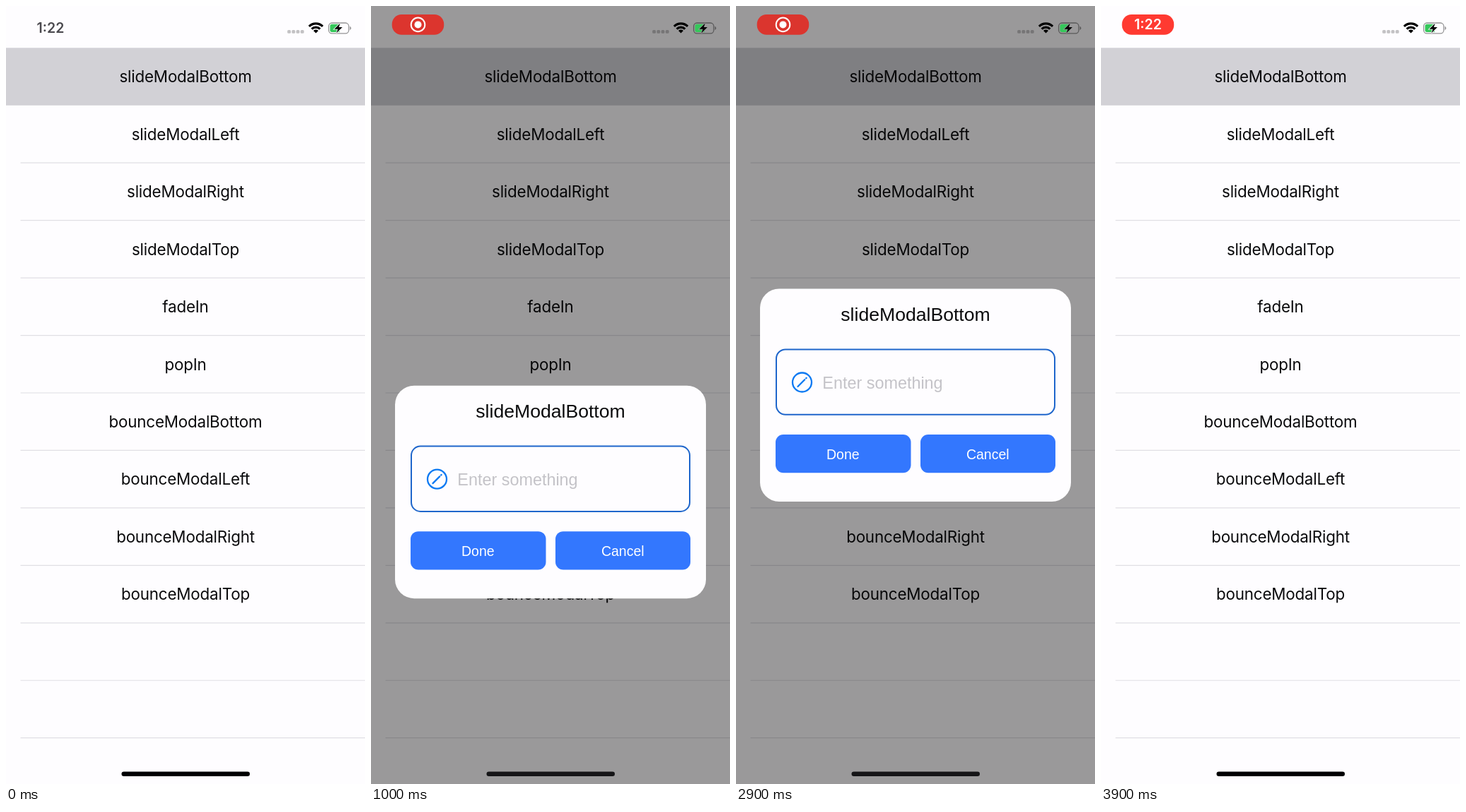
An HTML page that plays this animation: 508 by 1102 pixels, repeating every 4000 ms.

```html
<!DOCTYPE html>
<html lang="en">
<head>
<meta charset="utf-8">
<title>Modal slide</title>
<style>
  html, body { margin: 0; width: 100%; height: 100%; overflow: hidden; background: #fefdff; }
  svg { display: block; width: 100%; height: 100%; }
  text { text-anchor: middle; }
  #list text { font: 400 22.4px Inter, sans-serif; letter-spacing: -.2px; fill: #0a0a0c; }
  #list line { stroke: #e0dfe4; stroke-width: 1.2; }
  .clock { font: 600 19.5px Inter, sans-serif; }
  #modal text { font-family: "Liberation Sans", Arial, sans-serif; }
  #modal .button { font-size: 19.5px; fill: #fff; }
</style>
</head>
<body>
<svg viewBox="0 0 508 1102">
  <defs>
    <clipPath id="wedge"><path d="M438.5 38.5L422.5 22.5V10H454.5V22.5Z"/></clipPath>
  </defs>

  <rect width="508" height="1102" fill="#fefdff"/>
  <g id="list">
    <rect y="59.3" width="508" height="81.5" fill="#d2d1d6"/>
  </g>
  <rect id="dim" width="508" height="1102"/>

  <g id="modal">
    <rect x="34" y="400.5" width="440" height="301.5" rx="27" fill="#fefdff"/>
    <text x="254" y="445.5" font-size="26.6" fill="#0a0a0c">slideModalBottom</text>
    <rect x="57" y="486.4" width="394" height="92.4" rx="13" fill="none" stroke="#1f66cb" stroke-width="2"/>
    <g fill="none" stroke="#0b79f2" stroke-width="2.3" stroke-linecap="round">
      <circle cx="93.5" cy="533" r="13.5"/>
      <path d="M87.5 539L97.2 529.3M99.2 527.3L99.6 526.9"/>
    </g>
    <text x="122.3" y="541.5" font-size="23.4" fill="#c4c3c8" style="text-anchor:start">Enter something</text>
    <g fill="#3377fe">
      <rect x="56" y="607" width="191.5" height="54.3" rx="11"/>
      <rect x="261" y="607" width="191" height="54.3" rx="11"/>
    </g>
    <text class="button" x="151.3" y="641.7">Done</text>
    <text class="button" id="cancel" x="356.3" y="641.7">Cancel</text>
  </g>

  <g id="status">
    <g id="dots" fill-opacity=".23"></g>
    <g clip-path="url(#wedge)">
      <g fill="none" stroke="#000" stroke-width="3.1">
        <circle cx="438.5" cy="38.5" r="13.6"/>
        <circle cx="438.5" cy="38.5" r="8.4"/>
      </g>
      <circle cx="438.5" cy="38.5" r="4.9"/>
    </g>
    <rect x="456.6" y="24" width="28.4" height="14.8" rx="4.6" fill="none" stroke="#000" stroke-opacity=".42" stroke-width="1.3"/>
    <path d="M486.6 28.8a2.8 2.8 0 0 1 0 5.2Z" fill-opacity=".45"/>
    <path d="M461.2 25.8H472V37H461.2a2.7 2.7 0 0 1-2.7-2.7V28.500a2.7 2.7 0 0 1 2.700-2.700Z" fill="#35c75a"/>
    <path id="bolt" d="M472.800 24.500L464.500 32.700H469.600L467.400 38.400L476 30H471Z" stroke-width="1.600" paint-order="stroke"/>
  </g>

  <text class="clock" id="clock" x="63" y="38.200" fill="#4a494e">1:22</text>
  <g id="pill">
    <rect id="pillShape" x="29.700" y="12" width="73.500" height="28.800" rx="13.500"/>
    <g id="record">
      <circle cx="66.500" cy="26.400" r="9.800" fill="none" stroke="#fff" stroke-width="2"/>
      <circle cx="66.500" cy="26.400" r="5" fill="#fff"/>
    </g>
    <text class="clock" id="pillClock" x="66.500" y="33.300" fill="#fff">1:22</text>
  </g>
  <rect id="home" x="163.500" y="1084.500" width="181.500" height="6.600" rx="3.300"/>
</svg>

<script>
const LOOP = 4000, STEP = 100;
const ROW_TOP = 59.3, ROW_HEIGHT = 81.45, SLIDE = 702, DIM = .395;
const rows = ['slideModalBottom', 'slideModalLeft', 'slideModalRight', 'slideModalTop', 'fadeIn', 'popIn',
  'bounceModalBottom', 'bounceModalLeft', 'bounceModalRight', 'bounceModalTop'];

const $ = id => document.getElementById(id);
const add = (parent, tag, attrs, text = '') => {
  const node = document.createElementNS('http://www.w3.org/2000/svg', tag);
  for (const key in attrs) node.setAttribute(key, attrs[key]);
  node.textContent = text;
  parent.append(node);
};

for (let i = 0; i < 12; i++) {
  const top = ROW_TOP + i * ROW_HEIGHT, bottom = top + ROW_HEIGHT;
  if (i) add($('list'), 'line', { x1: 20.5, x2: 508, y1: bottom, y2: bottom });
  if (rows[i]) add($('list'), 'text', { x: 254, y: top + 49 }, rows[i]);
}
for (let i = 0; i < 4; i++) {
  add($('dots'), 'rect', { x: 398.2 + i * 6.2, y: 34, width: 4.8, height: 4.8, rx: 1.5 });
}

const ramp = (t, start, end) => Math.min(1, Math.max(0, (t - start) / (end - start)));
const ease = (t, start, end) => {
  const x = ramp(t, start, end);
  return x * x * (3 - 2 * x);
};
const mix = (a, b, p) => a + (b - a) * p;
const rgb = (...c) => `rgb(${c.map(Math.round)})`;

function draw(t) {
  const shade = ease(t, 600, 800) - ease(t, 3250, 3550);
  const shown = ease(t, 785, 1085) - ease(t, 3257, 3557);
  $('dim').setAttribute('opacity', DIM * shade);
  $('modal').setAttribute('transform', `translate(0 ${SLIDE * (1 - shown)})`);
  $('cancel').setAttribute('opacity', t >= 3100 ? .55 : 1);

  const light = 1 - DIM * shade;
  $('bolt').setAttribute('stroke', rgb(254 * light, 253 * light, 255 * light));
  const grey = 21 * ramp(shade, .5, 1);
  $('home').setAttribute('fill', rgb(grey, grey, grey + 2));

  const visible = ramp(t, 0, 300);
  $('clock').setAttribute('opacity', 1 - visible);
  $('pill').setAttribute('opacity', visible);
  const pulse = .5 + .5 * Math.cos((t - 1900) / 1000 * Math.PI);
  $('pillShape').setAttribute('fill', rgb(mix(219, 255, pulse), mix(53, 58, pulse), mix(46, 49, pulse)));
  const timeShown = t >= 3100;
  $('record').setAttribute('opacity', timeShown ? 0 : 1);
  $('pillClock').setAttribute('opacity', timeShown ? 1 : 0);
}

const started = performance.now();
function tick() {
  const t = (performance.now() - started) % LOOP;
  draw(Math.floor(t / STEP) * STEP);
  requestAnimationFrame(tick);
}
tick();
</script>
</body>
</html>
```
